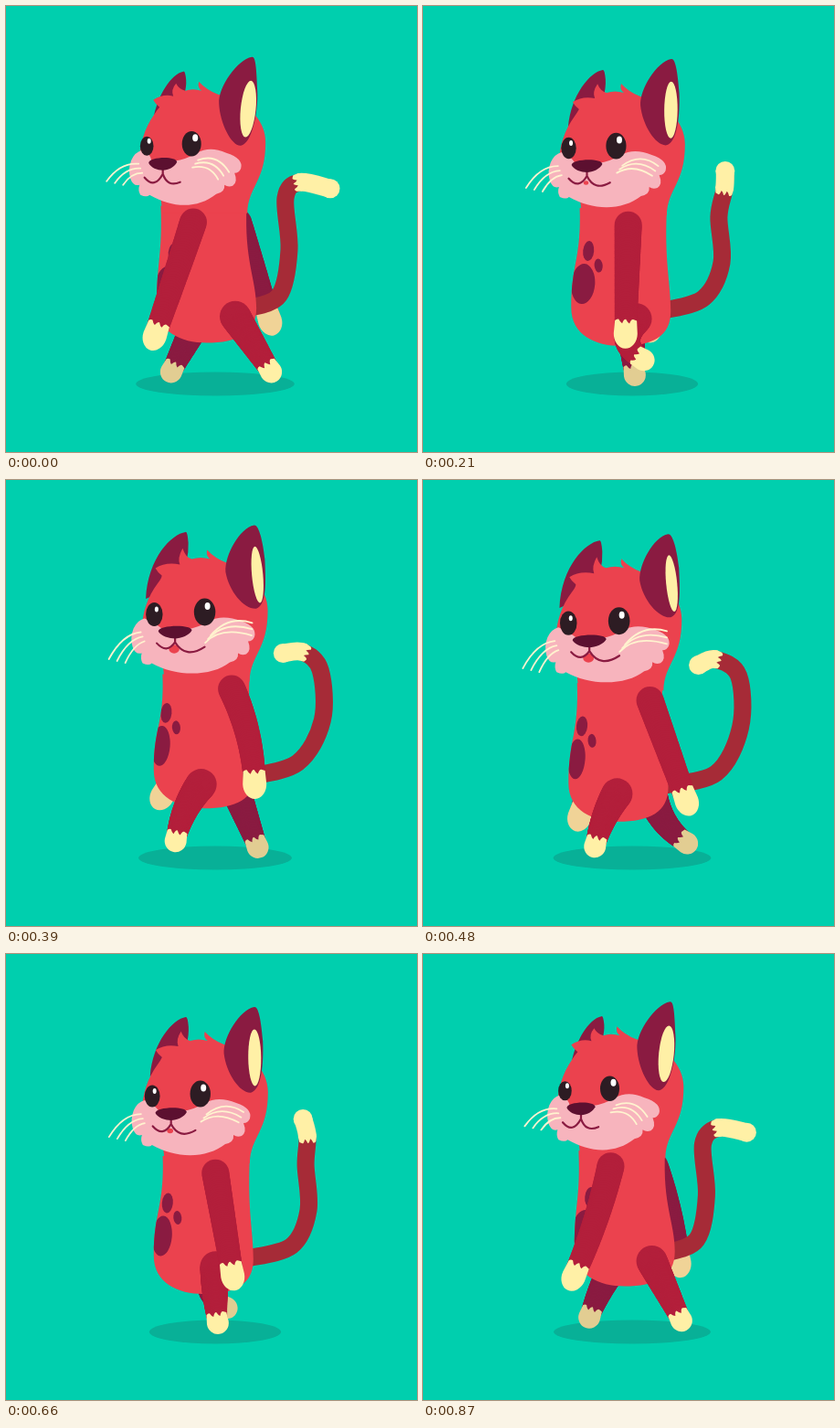
Write an HTML page with a canvas that moves like this. It is 450 px wide and 488 px high and loops after 0.9 s.

```html
<!DOCTYPE html>
<html lang="en">
<head>
<meta charset="utf-8">
<title>Walking cat</title>
<style>
html, body { margin: 0; width: 450px; height: 488px; overflow: hidden; background: #00cfae; }
canvas { display: block; }
</style>
</head>
<body>
<canvas id="stage" width="450" height="488"></canvas>
<script>
const ctx = document.getElementById('stage').getContext('2d');
const LOOP = 900, HALF = LOOP / 2, STEP = 30;
const RED = '#eb424e', NEAR = '#b31f3b', DARK = '#8a1b41', TAIL_RED = '#a62b37';
const CREAM = '#fff0a6', DIM_CREAM = '#e2cd92', PINK = '#f7b4bd', INK = '#2d1c23', NOSE = '#5c1030';

const wave = (t, period, peak = 0) => Math.cos(2 * Math.PI * (t - peak) / period);
const bob = t => wave(t, HALF, 115);

function oval(x, y, rx, ry, color, angle = 0) {
  ctx.fillStyle = color;
  ctx.beginPath();
  ctx.ellipse(x, y, rx, ry, angle, 0, 7);
  ctx.fill();
}

function fill(path, color) {
  ctx.fillStyle = color;
  ctx.fill(new Path2D(path));
}

function line(path, color, width) {
  ctx.strokeStyle = color;
  ctx.lineWidth = width;
  ctx.stroke(new Path2D(path));
}

// Cream paw with a ragged upper edge.
function sock(x, y, angle, r, back, front, color) {
  ctx.save();
  ctx.translate(x, y);
  ctx.rotate(angle);
  ctx.fillStyle = color;
  ctx.beginPath();
  ctx.ellipse(0, 0, front, r, 0, -Math.PI / 2, Math.PI / 2);
  ctx.lineTo(-back, r - 1);
  for (let i = 1; i <= 5; i++) {
    const side = (r - 1) * (1 - i / 3);
    ctx.quadraticCurveTo(-back - (i % 2 ? 2 : -2), side + r / 6, -back + (i % 2 ? -1.5 : 3), side);
  }
  ctx.lineTo(-back, 1 - r);
  ctx.fill();
  ctx.restore();
}

// Tapered limb; bend pushes the middle sideways.
function limb(x0, y0, x1, y1, bend, r0, r1, color, paw) {
  const len = Math.hypot(x1 - x0, y1 - y0);
  const cx = (x0 + x1) / 2 - bend * (y1 - y0) / len;
  const cy = (y0 + y1) / 2 + bend * (x1 - x0) / len;
  for (let i = 0; i <= 50; i++) {
    const u = i / 50, v = 1 - u, r = r0 + (r1 - r0) * u;
    oval(v * v * x0 + 2 * u * v * cx + u * u * x1, v * v * y0 + 2 * u * v * cy + u * u * y1, r, r, color);
  }
  sock(x1, y1, Math.atan2(y1 - cy, x1 - cx), ...paw);
}

// First half of the cycle: the foot swings forward. Second half: it slides back on the ground.
function leg(t, color, cream) {
  const swinging = t < HALF, u = (t % HALF) / HALF, arc = Math.sin(Math.PI * u);
  const x = swinging ? 235.5 + 54.5 * Math.cos(Math.PI * u) : 181 + 109 * u;
  const y = swinging ? 400 - 13 * arc : 400 + 3.5 * arc;
  const knee = swinging ? 28 * Math.sin(Math.PI * u ** 0.7) : 14 * Math.max(0, bob(t));
  limb(231.5 + 19.5 * wave(t, LOOP), 340 + 9 * bob(t), x, y, knee, 17, 10.5, color, [12, 10, 12.5, cream]);
}

function arm(t, color, cream, shift = 0) {
  const u = (t % HALF) / HALF;
  const x = t < HALF ? 163 + 126 * u : 226 + 63 * Math.cos(Math.PI * u ** 1.25);
  const y = 352 + 18 * wave(t, HALF, 110) + 8.5 * wave(t, LOOP, 40);
  limb(227 - 22 * wave(t, LOOP) + shift, 237 + 11 * bob(t), x, y, -14 * Math.max(0, -bob(t)),
    15, 12, color, [13, 14, 16.5, cream]);
}

// The upper joints follow the body with growing delay; the tip sways the other way.
function tail(t) {
  const sway = wave(t, LOOP);
  const points = [
    [265, 331 + 8 * bob(t)],
    [310 - 11 * wave(t, LOOP, 20), 317 + 10 * bob(t)],
    [329 - 19 * sway, 273 + 10 * wave(t, HALF, 160)],
    [326 - 20 * sway, 220 + 12 * wave(t, HALF, 180)],
    [326 + 6 * wave(t, HALF, 270), 196 + 8 * wave(t, HALF, 140)],
    [328 + 27 * sway, 189 + 14 * wave(t, HALF, 50)]
  ];
  const p = i => points[Math.max(0, Math.min(5, i))];
  const curve = i => {
    const [a, b, c, d] = [p(i - 1), p(i), p(i + 1), p(i + 2)];
    return `C${b.map((q, k) => q + (c[k] - a[k]) / 6)} ${c.map((q, k) => q - (d[k] - b[k]) / 6)} ${c}`;
  };
  line(`M${p(0)}` + [0, 1, 2, 3, 4].map(curve).join(''), TAIL_RED, 19);
  ctx.lineCap = 'butt';
  line(`M${p(4)}${curve(4)}`, CREAM, 20);
  ctx.lineCap = 'round';
  oval(...p(5), 10.5, 10.5, CREAM);
  sock(...p(4), Math.atan2(p(5)[1] - p(3)[1], p(5)[0] - p(3)[0]), 10, 5, 9, CREAM);
}

function body(t, hx, hy) {
  const bottom = 369 + 12.8 * bob(t), lean = wave(t, LOOP);
  const left = 162.5 + 2.5 * lean - 2 * bob(t), right = 272 + 2 * lean - 4 * bob(t);
  const neckL = 168.5 + 0.8 * hx, neckR = 262 + 1.3 * hx, neckY = 218 + hy;
  const mid = (left + right) / 2;
  const shape = `M${neckL} ${neckY}C${neckL + 2} ${neckY + 55} ${left} ${bottom - 90} ${left} ${bottom - 42}
    C${left} ${bottom - 12} ${mid - 28} ${bottom} ${mid} ${bottom}
    C${mid + 34} ${bottom} ${right} ${bottom - 10} ${right} ${bottom - 38}
    C${right} ${bottom - 70} ${neckR - 3} ${neckY + 60} ${neckR} ${neckY}Z`;
  fill(shape, RED);

  const x = 179 + 5 * wave(t, LOOP, 50);
  const y = 267.5 + 11.5 * bob(t) + 4 * wave(t, LOOP, 800);
  ctx.save();
  ctx.clip(new Path2D(shape));
  oval(x, y, 6, 11, DARK, 0.1);
  oval(x + 11, y + 16, 4.5, 7.5, DARK, -0.1);
  oval(x - 6, y + 36, 11 + (x - 177) * 0.5, 22, DARK, 0.08);
  ctx.restore();
}

function farEar(m) {
  fill(`M193 ${m(71, 62)}C${m(180, 178)} ${m(73, 64)} ${m(164, 151)} ${m(98, 90)} ${m(160, 149)} ${m(124, 136)}
    L185 120Q197 95 196 ${m(80, 74)}Q195 ${m(70, 61)} 193 ${m(71, 62)}Z`, DARK);
}

function head(m) {
  const nose = m(170.5, 182), wide = m(15.5, 18.5), cheek = m(257, 270);
  const b = m(185, 190), bTop = m(84, 80), c = m(210, 217);

  fill(`M170 226L168 206C138 192 140 148 ${m(161, 163)} 118Q${m(164, 167)} 113 167 110Q162 106 160 102
    Q171 95 ${b - 3} 98Q${b - 6} 91 ${b} ${bTop}Q${b + 3} 90 ${b + 10} 92Q${c - 7} 89 ${c + 3} 92
    Q${c - 2} 88 ${c} 82Q${c + 8} 91 ${c + 21} 96
    C262 102 283 124 283 148C283 192 264 196 263 226Z`, RED);

  fill(`M268 55C252 58 ${m(231, 236)} 88 ${m(232, 237)} 106
    C${m(233, 241)} 128 ${m(246, 258)} ${m(153, 147)} ${m(256, 271)} ${m(152, 146)}
    C${m(268, 283)} ${m(150, 142)} ${m(275, 281)} 116 ${m(274, 280)} 92C${m(273, 277)} 66 272 54 268 55Z`, DARK);
  oval(m(264, 272), m(112, 109), m(8.3, 6), 31, CREAM, m(0.1, -0.1));

  fill(`M148 157Q157 160 ${nose - 12} 170L${nose + 12} 169Q${nose + 26} 167 ${m(208, 219)} 160
    Q${m(222, 234)} 152 ${m(240, 255)} 160Q${cheek + 2} 166 ${cheek - 1} 177
    Q${cheek - 3} 182 ${cheek - 8} 182Q${cheek - 4} 192 ${cheek - 10} 196Q${cheek - 15} 198 ${cheek - 19} 195
    Q${cheek - 18} 203 ${cheek - 28} 205C${cheek - 48} 221 182 221 156 206Q153 209 146 206
    Q143 201 145 195Q138 197 135 188Q132 178 136 168Q140 159 148 157Z`, PINK);

  oval(m(153, 159), 152.5, m(7.3, 9.3), m(10.5, 13.2), INK);
  oval(m(155.5, 161.5), 147, 2, 3, '#fff');
  oval(m(202, 214.5), 150, m(10.5, 11.8), m(13.8, 15), INK);
  oval(m(206, 217.5), 143.5, 3, 4, '#fff');

  const open = m(0, 1);
  oval(nose - 1, 190.5, 6 * open, 5 * open, RED);
  line(`M${nose - 20} ${m(187, 184)}Q${nose - 9} ${m(200, 196)} ${nose} 183
    Q${nose + m(5, 12)} ${m(198, 202)} ${nose + m(19, 33)} ${m(192, 188)}M${nose} 176V184`, DARK, 2.2);
  fill(`M${nose - wide} 171C${nose - wide} 164 ${nose + wide} 163 ${nose + wide} 170
    C${nose + wide - 2} 175 ${nose + 6} 179 ${nose} 179C${nose - 6} 179 ${nose - wide + 2} 176 ${nose - wide} 171Z`, NOSE);

  for (let i = 0; i < 3; i++) {
    line(`M${144 + 2 * i} ${172 + 5 * i}Q${124 + 6 * i} ${m(170, 174) + 6 * i} ${109 + 9 * i} ${m(191, 202) + 2 * i}
      M${m(209, 221) - 3 * i} ${m(168, 176) + 4 * i}Q${m(230, 240) - 4 * i} ${m(160, 153) + 6 * i}
      ${m(243, 267) - m(6, 0) * i} ${m(181, 161) + m(4, 7) * i}`, '#fff3cf', 1.8);
  }
}

function draw(t) {
  const opposite = (t + HALF) % LOOP;
  const hx = 2.8 - 3 * wave(t, HALF, 72), hy = 1 + 8.5 * bob(t);
  const turn = (1 - wave(t, LOOP)) / 2;
  const m = (a, b) => a + (b - a) * turn;
  const inHead = part => {
    ctx.save();
    ctx.translate(hx, hy);
    part(m);
    ctx.restore();
  };

  ctx.fillStyle = '#00cfae';
  ctx.fillRect(0, 0, 450, 488);
  ctx.lineCap = ctx.lineJoin = 'round';
  oval(229, 413.5, 79.3 + 7.5 * wave(t, HALF, 5), 13, '#08b097');
  arm(opposite, DARK, '#f0d397', 5);
  leg(opposite, DARK, DIM_CREAM);
  tail(t);
  inHead(farEar);
  body(t, hx, hy);
  inHead(head);
  leg(t, NEAR, CREAM);
  arm(t, NEAR, CREAM);
}

const start = performance.now();
function tick(now) {
  const t = Math.max(0, now - start) % LOOP;
  draw(Math.floor(t / STEP) * STEP);
  requestAnimationFrame(tick);
}
draw(0);
requestAnimationFrame(tick);
</script>
</body>
</html>
```
